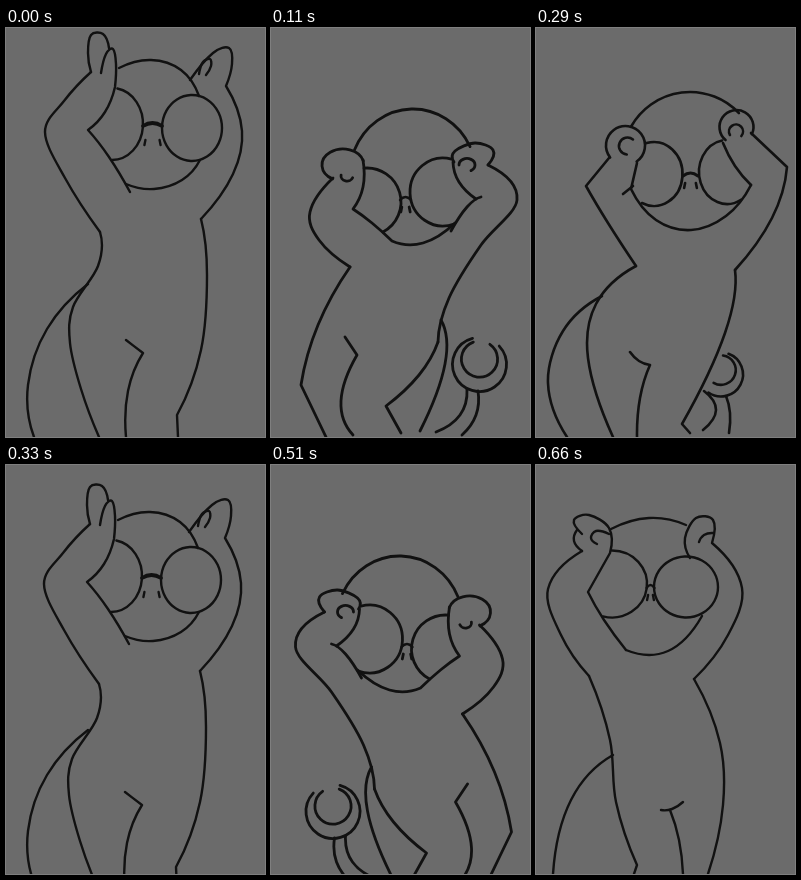
Recreate the animation shown at these times as an HTML page. Size 259 px wide and 409 px high, loop 0.77 s.

```html
<!DOCTYPE html>
<html lang="en">
<head>
<meta charset="utf-8">
<title>Dance loop</title>
<style>
html, body { margin: 0; width: 100%; height: 100%; overflow: hidden; background: #6b6b6b; }
svg { display: block; width: 100%; height: 100%; }
path { fill: none; stroke: #111; stroke-linecap: round; stroke-linejoin: round; }
</style>
</head>
<body>
<svg id="stage" viewBox="0 0 259 409"></svg>
<script>
const HOLD = 110;
const path = (d, attrs = "") => `<path d="${d}" ${attrs}/>`;
const points = text => text.trim().split(/\s+/).map(p => p.split(",").map(Number));

// Smooth spline through key points; three points make a parabola, two a straight line.
function spline(pts) {
  const beyond = (a, b, c) => a.map((v, k) => c ? 3 * v - 3 * b[k] + c[k] : 2 * v - b[k]);
  const n = pts.length;
  const all = [
    beyond(pts[0], pts[1], pts[2]),
    ...pts,
    beyond(pts[n - 1], pts[n - 2], pts[n - 3])
  ];
  let d = "";
  for (let i = 1; i < n; i++) {
    const [p, a, b, q] = all.slice(i - 1, i + 3);
    const c1 = a.map((v, k) => v + (b[k] - p[k]) / 6);
    const c2 = b.map((v, k) => v - (q[k] - a[k]) / 6);
    d += `C${c1} ${c2} ${b}`;
  }
  return d;
}

// "|" turns a sharp corner at the point before it.
function line(text, attrs) {
  const parts = text.split("|").map(points);
  let d = "M" + parts[0][0];
  parts.forEach((pts, i) => {
    d += spline(i ? [parts[i - 1].at(-1), ...pts] : pts);
  });
  return path(d, attrs);
}

// Clockwise elliptical arc, angles in degrees from the right-hand side.
function arc(x, y, rx, ry, from = 0, to = 359.9) {
  const at = deg => {
    const t = deg * Math.PI / 180;
    return [x + rx * Math.cos(t), y + ry * Math.sin(t)];
  };
  return path(`M${at(from)}A${rx} ${ry} 0 ${+(to - from > 180)} 1 ${at(to)}`);
}

// Bridge of the glasses with two nostrils below it.
function nose(x, y, half, drop) {
  const nostril = side => {
    const nx = x + side * half * 0.85;
    return line(`${nx - side},${y + drop - 3} ${nx},${y + drop + 2}`);
  };
  const width = `stroke-width="${Math.max(2.4, half * 0.4)}"`;
  return line(`${x - half},${y} ${x},${y - 3} ${x + half},${y}`, width) + nostril(-1) + nostril(1);
}

// Crescent at the end of the tail.
const claw = (x, y, r, from, to) =>
  arc(x, y, r, r, from, to) + arc(x, y - r / 5, r * 0.67, r * 0.67, from - 12, to - 5);

const raised = {
  weight: 2.4,
  head: [
    line("113,40 145,32 175,42 193,68"),
    line("120,156 148,161 176,152 194,132"),
    arc(106, 96, 31, 36, -80, 90),
    arc(186, 100, 30, 33),
    nose(146.5, 98, 9.5, 17)
  ],
  arms: [
    line("85,44 82,25 85,7 97,6 103,20"),
    line("95,45 100,26 107,21 110,36 109,59 | 99,84 82,102 | 103,129 124,164"),
    line("85,44 58,73 39,104 59,150 94,204"),
    line("184,52 207,25 223,20 226,36 220,58 | 236,103 227,146 195,191"),
    line("193,46 197,34 204,31 205,38 200,47")
  ],
  body: [
    line("94,204 92,238 67,279 64,315 75,361 93,409"),
    line("195,191 201,247 195,322 171,387 | 172,409"),
    line("120,312 137,325 | 122,363 120,409")
  ],
  tail: [line("82,256 41,301 22,357 28,409")]
};

const bent = {
  weight: 2.8,
  head: [
    arc(142, 148, 63.5, 67, 203, 334),
    arc(96, 174, 34, 34, -95, 62),
    arc(172, 164, 33, 34, 70, 285),
    nose(134.5, 172, 5.5, 10)
  ],
  arms: [
    arc(72, 137, 21, 16, 120, 345),
    line("92,132 92,159 82,181 | 101,195 121,213 | 152,215 184,195"),
    arc(76, 148, 6, 5, 20, 190),
    line("62,150 39,184 48,212 79,239"),
    line("183,134 184,123 204,115 222,122 217,137"),
    arc(196, 137, 8, 6.5, 180, 420),
    line("182,134 188,154 205,171"),
    line("210,169 196,179 180,203"),
    line("217,137 246,172 210,217 178,270 167,314")
  ],
  body: [
    line("79,239 47,297 30,357 | 55,409"),
    line("167,314 148,347 115,378 | 130,405"),
    line("74,309 86,327 | 70,373 82,407")
  ],
  tail: [
    line("170,292 174,336 149,403"),
    claw(208.5, 336.5, 27, -43, 255),
    line("196,361 189,387 165,404"),
    line("207,363 205,387 191,407")
  ]
};

const swung = {
  weight: 2.6,
  head: [
    arc(154, 133, 68, 69, 210, 316),
    arc(118, 146, 28.5, 32, -105, 115),
    arc(191, 144, 28, 32, 60, 260),
    nose(154.5, 148, 7.5, 10)
  ],
  arms: [
    arc(89.5, 117.5, 19.5, 19.5, 142, 415),
    arc(91.5, 118, 8.5, 8.5, 95, 310),
    line("73,130 50,158 | 72,195 100,238"),
    line("101,135 95,161 | 120,192 155,202 190,188 215,157"),
    line("97,158 87,166"),
    arc(200.5, 99, 17, 17, 130, 385),
    arc(200, 103.5, 7, 7, 150, 400),
    line("187,115 199,138 215,157"),
    line("215,105 251,139 | 236,190 199,242")
  ],
  body: [
    line("199,242 189,305 146,396 | 154,405"),
    line("100,238 60,276 52,330 77,409"),
    line("94,324 103,333 114,337 | 104,370 101,409")
  ],
  tail: [
    line("66,268 27,303 12,355 31,409"),
    claw(185, 346.5, 22, -70, 125),
    line("190,368 194,385 193,405"),
    line("168,363 180,382 167,402")
  ]
};

const settled = {
  weight: 2.4,
  head: [
    line("75,64 113,53 150,60"),
    line("90,185 132,186 166,151"),
    arc(76, 119, 35, 33.5, -90, 105),
    arc(150, 122, 32, 30.5),
    nose(114.5, 123, 4, 10)
  ],
  arms: [
    line("46,69 38,55 53,50 73,63 74,88 | 52,127 | 68,155 90,185"),
    line("41,65 38,76 46,86"),
    line("73,69 60,66 55,73 61,79"),
    line("46,86 12,124 25,170 53,211"),
    line("154,93 149,73 160,53 177,55 176,78 | 206,123 192,170 158,214"),
    line("163,77 168,70 177,68")
  ],
  body: [
    line("53,211 74,275 80,337 101,400 | 98,409"),
    line("158,214 184,278 187,340 172,409"),
    line("125,345 136,344 147,337"),
    line("134,345 143,375 147,409")
  ],
  tail: [line("77,290 35,335 17,409")]
};

// The dance repeats its poses shifted or mirrored.
const steps = [
  { pose: raised },
  { pose: bent },
  { pose: swung },
  { pose: raised, move: "translate(-1 15)", tail: "translate(1 -6)" },
  { pose: bent, move: "translate(270.5 10) scale(-1 1)" },
  { pose: swung, move: "translate(260 7) scale(-1 1)" },
  { pose: settled }
];

function figure({ pose, move = "", tail = "" }) {
  const { weight, head, arms, body } = pose;
  return `<g transform="${move}" stroke-width="${weight}">
    ${[...head, ...arms, ...body].join("")}
    <g transform="${tail}">${pose.tail.join("")}</g>
  </g>`;
}

const stage = document.getElementById("stage");
const figures = steps.map(figure);
const start = performance.now();
let shown = -1;

function draw() {
  const index = Math.floor((performance.now() - start) / HOLD) % steps.length;
  if (index !== shown) {
    stage.innerHTML = figures[index];
    shown = index;
  }
  requestAnimationFrame(draw);
}
draw();
</script>
</body>
</html>
```
